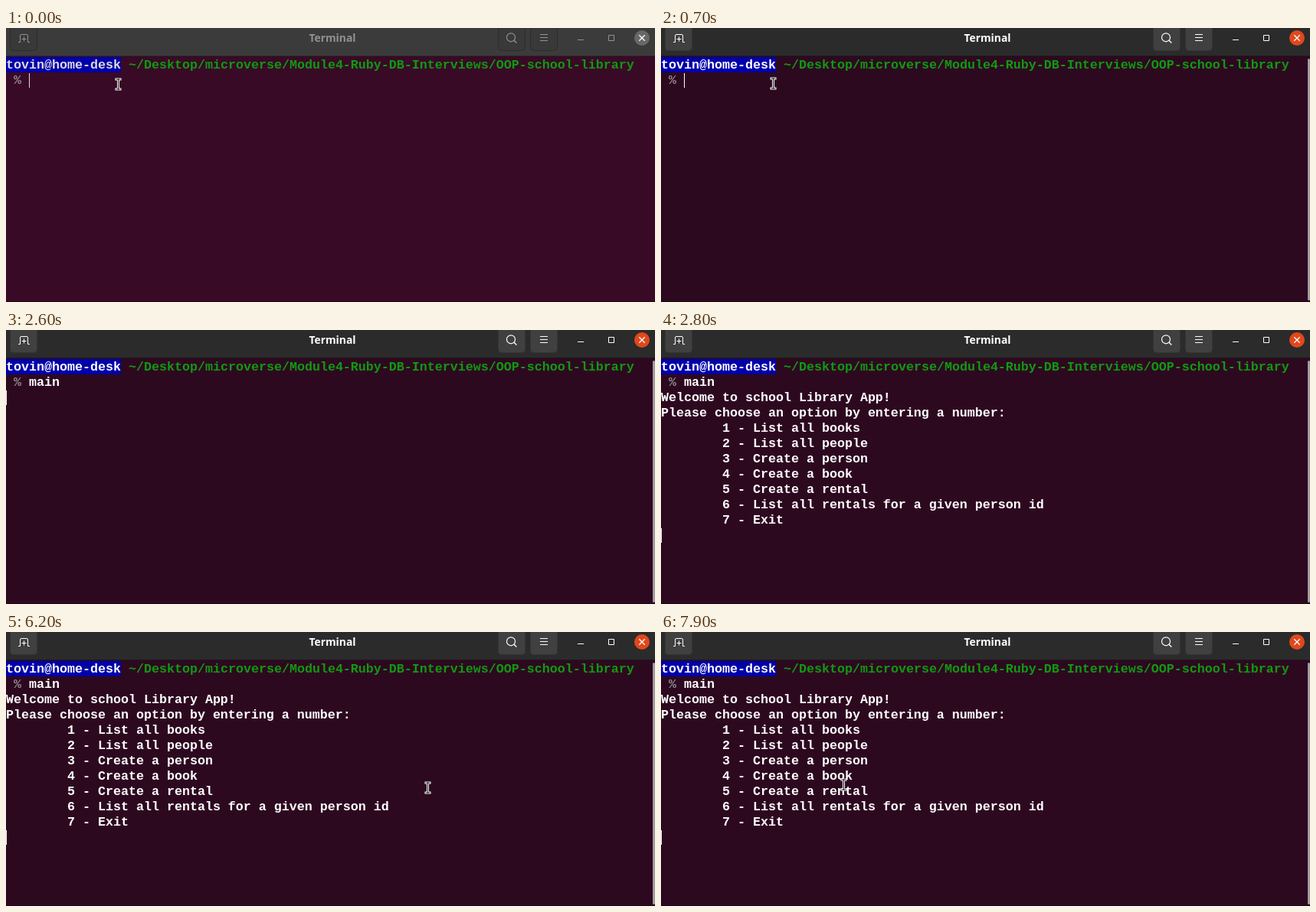
Recreate the animation shown at these times as an HTML page. Size 847 by 358 pixels, loop 8000 ms.

```html
<!DOCTYPE html>
<html lang="en">
<head>
<meta charset="utf-8">
<title>Terminal</title>
<style>
  html, body { margin: 0; width: 100%; height: 100%; overflow: hidden; background: #2d0922; }
  svg { display: block; width: 847px; height: 358px; }
  .mono { font: bold 16.664px "Liberation Mono", monospace; white-space: pre; fill: var(--text); }
  .title { font: bold 13.9px "Open Sans", "Noto Sans", sans-serif; text-anchor: middle; fill: var(--icon); }
  .button { fill: var(--button); stroke: var(--edge); }
  .icon { fill: none; stroke: var(--icon); }
</style>
</head>
<body>
<svg id="stage" viewBox="0 0 847 358" xmlns="http://www.w3.org/2000/svg">
  <rect width="847" height="358" style="fill:var(--back)"/>
  <rect y="357" width="847" height="1" fill="#1d0616" opacity=".7"/>
  <rect id="scrollbar" x="844" y="40" width="3" height="316" rx="1.5" fill="#a19c9e"/>

  <rect width="847" height="36" style="fill:var(--head)"/>
  <rect y="36" width="847" height="1" style="fill:var(--line)"/>
  <g class="button">
    <path d="M5.5 -1V25.500q0 4 4 4H36.500q4 0 4-4V-1"/>
    <path d="M642.500 -1V25.500q0 4 4 4H673.500q4 0 4-4V-1"/>
    <path d="M684.500 -1V25.500q0 4 4 4H715.500q4 0 4-4V-1"/>
  </g>
  <g class="icon">
    <path d="M16 18.500H18.500V10q0-1.500 1.500-1.500H27q1.500 0 1.500 1.500V18.500H31M23.500 11.500V17.500M20.500 14.500H26.500"/>
    <circle cx="659" cy="12.300" r="5.500" stroke-width="1.200"/>
    <path d="M663 16.300L666.300 19.600" stroke-width="1.400"/>
    <path d="M697 8.500H707M697 12.500H707M697 16.500H707" stroke-width="1.200"/>
    <path d="M746 15.500H754M786.500 9.500H793.500V16.500H786.500Z"/>
  </g>
  <circle cx="830" cy="13" r="10" style="fill:var(--close)"/>
  <path d="M826.300 9.300L833.700 16.700M833.700 9.300L826.300 16.700" stroke="#fff" stroke-width="1.300"/>
  <text class="title" x="426" y="18">Terminal</text>

  <rect y="38" width="150" height="20" fill="#0000aa"/>
  <text class="mono" x="0" y="53">tovin@home-desk</text>
  <text class="mono" x="160" y="53" style="fill:#0f9b0f">~/Desktop/microverse/Module4-Ruby-DB-Interviews/OOP-school-library</text>
  <text class="mono" x="10" y="73" style="fill:#918a8f">%</text>
  <text class="mono" id="command" x="30" y="73"></text>
  <g id="output"></g>
  <rect id="caret" width="1" height="19" style="fill:var(--text)"/>
  <g id="pointer" fill="none" stroke-linecap="square">
    <path d="M-2.500 -6.500H2.500M0 -6.500V6.500M-2.500 6.500H2.500" stroke="#fff" stroke-width="3"/>
    <path d="M-2.500 -6.500H2.500M0 -6.500V6.500M-2.500 6.500H2.500" stroke="#111" stroke-width="1"/>
  </g>
</svg>
<script>
const LOOP = 8000, STEP = 100;
const $ = id => document.getElementById(id);
const stage = $("stage"), command = $("command"), output = $("output");
const caret = $("caret"), pointer = $("pointer"), scrollbar = $("scrollbar");

const menu = [
  "Welcome to school Library App!",
  "Please choose an option by entering a number:",
  ...["List all books", "List all people", "Create a person", "Create a book",
    "Create a rental", "List all rentals for a given person id", "Exit"
  ].map((item, i) => `        ${i + 1} - ${item}`)
];
menu.forEach((line, i) => {
  const text = document.createElementNS(stage.namespaceURI, "text");
  text.setAttribute("class", "mono");
  text.setAttribute("y", 93 + 20 * i);
  text.textContent = line;
  output.append(text);
});

// Window colours as [unfocused, focused] RGB.
const palette = {
  back: [[56, 10, 38], [45, 9, 32]],
  head: [[59, 59, 59], [43, 43, 43]],
  line: [[43, 39, 41], [28, 25, 27]],
  button: [[57, 57, 57], [64, 64, 64]],
  edge: [[44, 44, 44], [52, 52, 52]],
  icon: [[146, 146, 146], [255, 255, 255]],
  close: [[104, 104, 104], [224, 72, 28]],
  text: [[223, 219, 221], [255, 255, 255]]
};

// Pointer strokes: [time, x, y]; hidden between them.
const strokes = [
  { from: 0, to: 1300, keys: [[0, 146, 73], [600, 146, 73], [700, 146, 72], [1300, 680, 199]] },
  { from: 6100, to: LOOP, keys: [
    [6100, 685, 199], [6200, 550, 203], [6300, 550, 203], [6600, 300, 192], [6900, 134, 192],
    [7000, 134, 192], [7400, 200, 188], [7500, 200, 188], [7700, 251, 197], [7900, 238, 199], [LOOP, 238, 199]
  ] }
];

const lerp = (a, b, k) => a + (b - a) * k;

function pointAt(keys, t) {
  const i = Math.max(1, keys.findIndex(key => key[0] >= t));
  const [t0, x0, y0] = keys[i - 1], [t1, x1, y1] = keys[i];
  const k = (t - t0) / (t1 - t0);
  return [lerp(x0, x1, k), lerp(y0, y1, k)].map(Math.round);
}

function drawFocus(t) {
  const k = t < 600 ? 0 : t < 700 ? 0.5 : 1;
  for (const [name, [off, on]] of Object.entries(palette))
    stage.style.setProperty("--" + name, `rgb(${off.map((c, i) => Math.round(lerp(c, on[i], k)))})`);
  scrollbar.setAttribute("opacity", k);
}

function drawShell(t) {
  const typed = t < 1900 ? 0 : Math.min(4, 2 + (t - 1900) / STEP);
  command.textContent = "main".slice(0, typed);
  output.style.display = t < 2800 ? "none" : "";

  const [x, y] = t < 2600 ? [30 + 10 * typed, 59] : t < 2800 ? [0, 79] : [0, 259];
  const blinkOff = t < 2600 ? t >= 1700 && t < 1900 : Math.floor((t - 2600) / 600) % 2 === 1;
  caret.setAttribute("x", x);
  caret.setAttribute("y", y);
  caret.style.display = blinkOff ? "none" : "";
}

function drawPointer(t) {
  const stroke = strokes.find(s => t >= s.from && t < s.to);
  pointer.style.display = stroke ? "" : "none";
  if (!stroke) return;
  const [x, y] = pointAt(stroke.keys, t);
  pointer.setAttribute("transform", `translate(${x + 0.5} ${y + 0.5})`);
}

function draw(now) {
  const t = Math.floor((now % LOOP) / STEP) * STEP;
  drawFocus(t);
  drawShell(t);
  drawPointer(t);
}

const start = performance.now();
function tick() {
  draw(performance.now() - start);
  requestAnimationFrame(tick);
}
tick();
</script>
</body>
</html>
```
